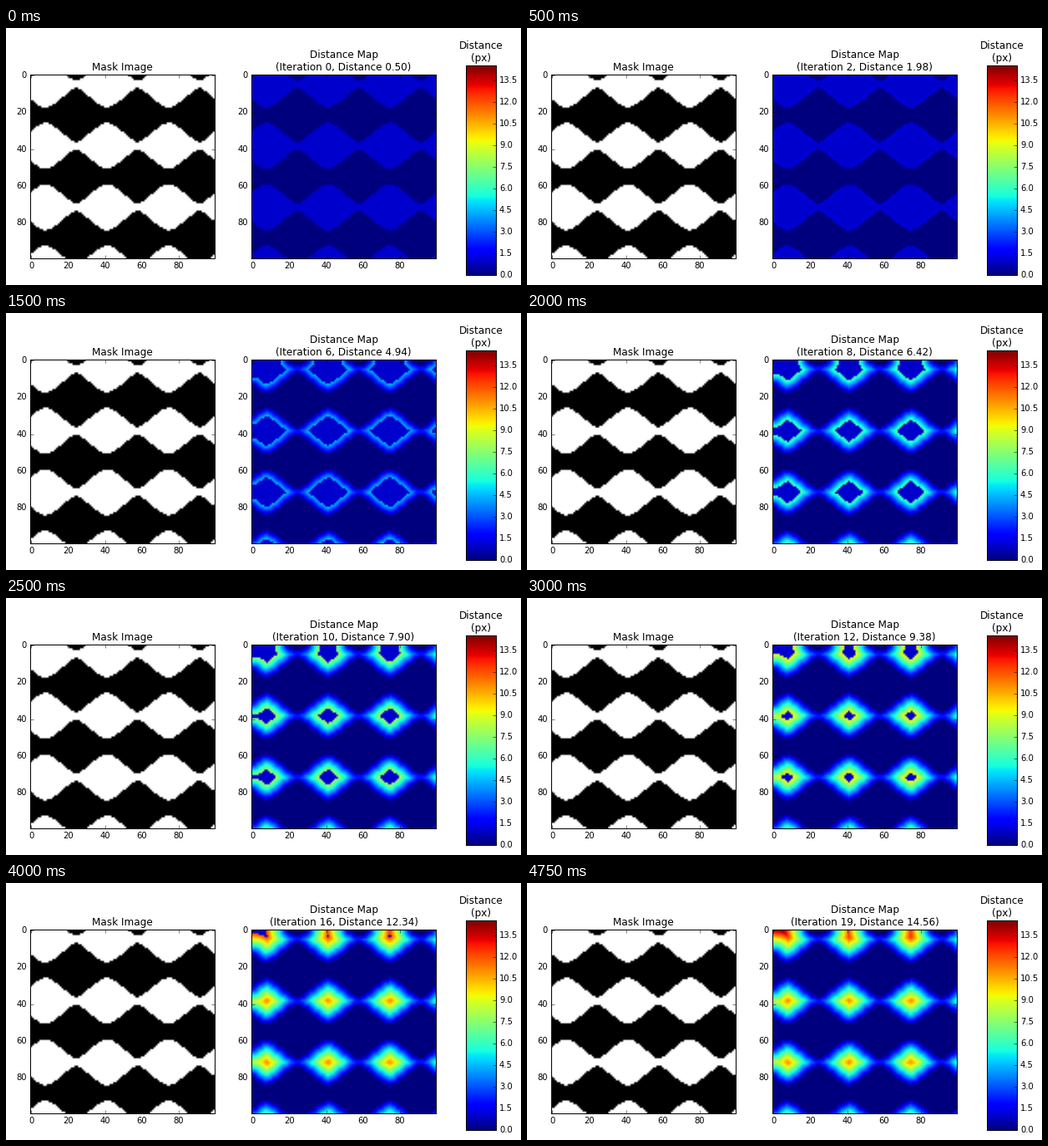
These frames come from a looping animation (617 by 309 pixels, 5000 ms). A matplotlib script:

```python
import numpy as np
import matplotlib.pyplot as plt
from matplotlib.animation import FuncAnimation

W, H, DPI = 617, 309, 72
SIZE, STEPS = 100, 20
PERIOD = 33.4

plt.style.use("classic")
plt.rcParams.update({
    "font.family": "DejaVu Sans",
    "font.size": 10,
    "axes.titlesize": 12,
    "xtick.labelsize": 10,
    "ytick.labelsize": 10,
    "figure.facecolor": "white",
    "savefig.facecolor": "white",
    "savefig.dpi": "figure",
})


def wavy_mask(n):
    """Horizontal bands whose thickness swells and narrows along x."""
    k = 2 * np.pi / PERIOD
    y, x = np.mgrid[:n, :n]
    return np.cos(k * (y - 4.85)) + 0.817 * np.cos(k * (x - 7.75)) > 0.113


def distance_map(mask):
    """Euclidean distance from each set pixel to the nearest clear one."""
    i = np.arange(len(mask))
    gap = (i[:, None] - i[None, :]) ** 2
    column = np.where(mask[None], 1e6, gap[:, :, None]).min(axis=1)
    return np.sqrt((column[:, None, :] + gap[None]).min(axis=2))


def pixel_axes(left, top, right, bottom):
    return fig.add_axes([left / W, 1 - bottom / H,
                         (right - left) / W, (bottom - top) / H])


def show_image(ax, data, cmap, vmax):
    image = ax.imshow(data, cmap=cmap, vmin=0, vmax=vmax, aspect="auto",
                      interpolation="bilinear", interpolation_stage="rgba")
    ticks = range(0, SIZE, 20)
    ax.set_xticks(ticks)
    ax.set_yticks(ticks)
    return image


mask = wavy_mask(SIZE)
dist = distance_map(mask)
peak = dist.max()
cutoffs = np.linspace(0.5, peak, STEPS)

fig = plt.figure(figsize=(W / DPI, H / DPI), dpi=DPI)

mask_ax = pixel_axes(29, 56, 250, 277)
show_image(mask_ax, mask.astype(float), "gray", 1)
mask_ax.set_title("Mask Image")

map_ax = pixel_axes(294, 56, 515, 277)
map_image = show_image(map_ax, mask.astype(float), "jet", peak)
map_title = map_ax.set_title("")

bar_ax = pixel_axes(551, 45, 587, 297)
bar_ax.imshow(np.linspace(0, peak, 256)[:, None], cmap="jet", origin="lower",
              extent=(0, 1, 0, peak), aspect="auto", interpolation="nearest")
bar_ax.set_xticks([])
bar_ax.yaxis.tick_right()
levels = np.arange(0, peak, 1.5)
bar_ax.set_yticks(levels, [f"{v:.1f}" for v in levels])
bar_ax.set_title("Distance\n(px)")


def update(step):
    cutoff = cutoffs[step]
    map_image.set_data(np.where(dist <= cutoff, dist, mask))
    map_title.set_text(
        f"Distance Map\n(Iteration {step}, Distance {cutoff:.2f})")
    return map_image, map_title


anim = FuncAnimation(fig, update, frames=STEPS, interval=250,
                     repeat=True, repeat_delay=0, blit=False)
plt.show()
```
